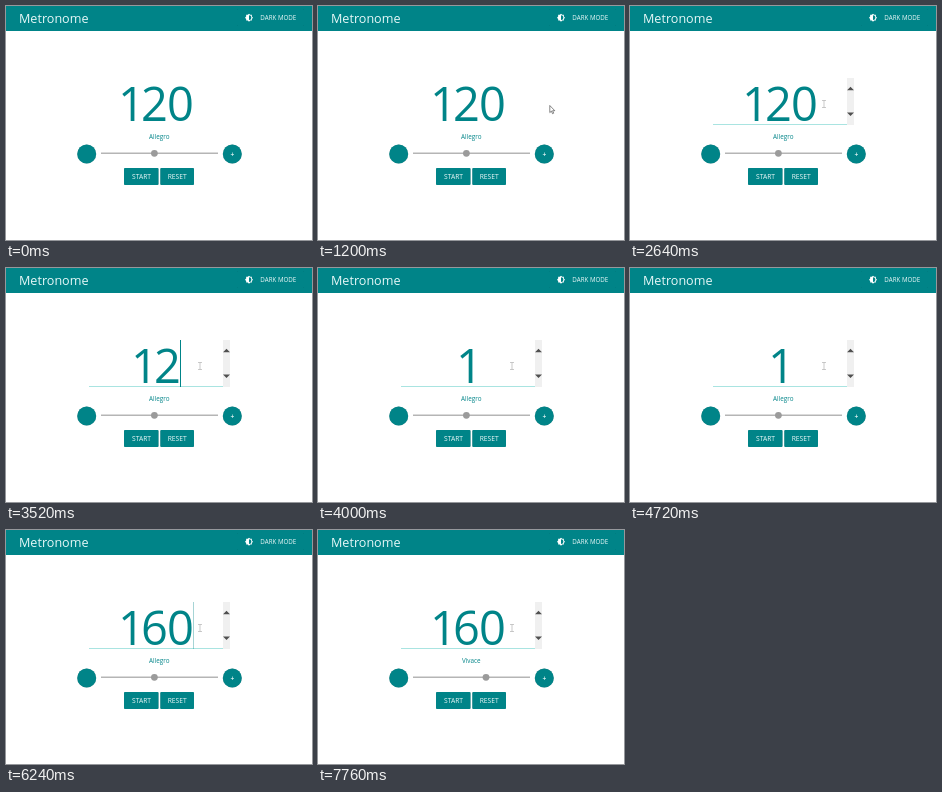
These frames come from a looping animation (306 by 234 pixels, 8 s). An HTML page:

```html
<!DOCTYPE html>
<html lang="en">
<head>
<meta charset="utf-8">
<title>Metronome</title>
<style>
  html, body { margin: 0; width: 100%; height: 100%; overflow: hidden; background: #fff; }
  svg { display: block; width: 306px; height: 234px; font-family: "Open Sans", "Noto Sans", sans-serif; }
  .teal { fill: #008488; }
  .raised { filter: drop-shadow(0 .6px .5px rgba(0, 0, 0, .28)); }
  .label { font-size: 6.7px; fill: #eaf8f8; text-anchor: middle; }
  #digits { font-size: 47px; letter-spacing: -.88px; }
  #tempo { font-size: 6.3px; text-anchor: middle; }
</style>
</head>
<body>
<svg viewBox="0 0 306 234">
  <rect width="306" height="234" fill="#fff"/>

  <rect class="teal" width="306" height="25"/>
  <text x="13" y="16.8" font-size="12.6" fill="#e6f8f8">Metronome</text>
  <rect class="teal raised" x="231" y="3" width="67" height="17" rx="1"/>
  <g transform="translate(243 11.7)">
    <path id="sun" fill="#fff"/>
    <path class="teal" d="M0 -2.4A2.4 2.4 0 0 1 0 2.4Z"/>
  </g>
  <text class="label" x="272.3" y="14" style="font-size: 6.2px">DARK MODE</text>

  <!-- dx sets the narrow leading 1 in the middle of its cell -->
  <text id="digits" class="teal" y="115" dx="3 -3"></text>
  <rect id="line" x="83" y="118" width="141" height="1" fill="#a9e4e1"/>
  <g id="spinner">
    <rect x="217" y="72" width="7" height="47" fill="#f0f0f0"/>
    <path d="M217 84.3L220.5 80.8L224 84.3ZM217 106.5L220.5 110L224 106.5Z" fill="#505050"/>
  </g>
  <rect id="caret" y="72" width="1" height="47" fill="#008488"/>

  <text id="tempo" class="teal" x="153.3" y="133.4"></text>
  <rect x="95" y="146.5" width="117" height="1.5" fill="#b5b5b5"/>
  <circle id="thumb" cy="147.3" r="3.4" fill="#9b9b9b"/>

  <g class="raised teal">
    <circle cx="80.7" cy="148" r="9.5"/>
    <circle cx="226.3" cy="148" r="9.5"/>
    <rect x="118" y="162" width="34.5" height="17" rx="1"/>
    <rect x="154.3" y="162" width="33.7" height="17" rx="1"/>
  </g>
  <text class="label" x="226.3" y="150.5" font-weight="600">+</text>
  <text class="label" x="135.5" y="173.2">START</text>
  <text class="label" x="171.2" y="173.2">RESET</text>

  <path id="arrow" d="M.5 .5V7.6L2.1 6.1L3.2 8.7L4.4 8.2L3.3 5.7H5.5Z" fill="#fff" stroke="#444" stroke-width=".65"/>
  <path id="beam" d="M-2 -3.5H2M0 -3.5V3.5M-2 3.5H2" fill="none" stroke="#b4b4b4" stroke-width=".7"/>
</svg>

<script>
  const LOOP = 8000, STEP = 80, CENTRE = 148, HALF_DIGIT = 13;
  const el = id => document.getElementById(id);
  const show = (id, on) => el(id).setAttribute("visibility", on ? "visible" : "hidden");

  // [start, value] pairs, each held until the next start
  const typed = [[0, "120"], [3520, "12"], [4000, "1"], [5920, "16"], [6240, "160"]];
  const caret = [[0, 0], [2080, 1], [2640, 0], [3120, 1], [3680, 0], [4160, 1], [4720, 0],
    [5200, 1], [5760, 0], [5920, 1], [6240, .35], [6320, 1], [6720, 0], [7360, 1], [7760, 0]];
  // [time, x, y] of the pointer
  const path = [[880, 301, 132], [1040, 264, 113], [1200, 231.3, 99], [1360, 216, 97], [1680, 200, 98], [1840, 194, 98]];

  const held = (list, t) => list.filter(([start]) => start <= t).pop()[1];

  function pointer(t) {
    const i = path.findIndex(p => p[0] > t);
    if (i < 0) return path[path.length - 1].slice(1);
    const a = path[i - 1], b = path[i], k = (t - a[0]) / (b[0] - a[0]);
    return [a[1] + (b[1] - a[1]) * k, a[2] + (b[2] - a[2]) * k];
  }

  function draw(t) {
    const text = held(typed, t), half = HALF_DIGIT * text.length;
    el("digits").textContent = text;
    el("digits").setAttribute("x", CENTRE - half);
    el("caret").setAttribute("x", CENTRE + half);
    el("caret").setAttribute("opacity", held(caret, t));
    show("line", t >= 2240);

    const lively = t >= 7760;
    el("tempo").textContent = lively ? "Vivace" : "Allegro";
    el("thumb").setAttribute("cx", lively ? 168 : 148.4);

    const here = t >= path[0][0];
    const [x, y] = here ? pointer(t) : [306, 140];
    const overText = x < 217;
    show("spinner", x < 224);
    show("arrow", here && !overText);
    show("beam", overText);
    for (const id of ["arrow", "beam"]) el(id).setAttribute("transform", `translate(${x} ${y})`);
  }

  // eight-pointed badge around the half disc
  el("sun").setAttribute("d", "M" + Array.from({ length: 16 }, (_, i) => {
    const r = i % 2 ? 3.1 : 4, a = i * Math.PI / 8;
    return (r * Math.cos(a)).toFixed(2) + " " + (r * Math.sin(a)).toFixed(2);
  }).join("L") + "Z");

  const begin = performance.now();
  function tick() {
    const t = (performance.now() - begin) % LOOP;
    draw(Math.floor(t / STEP) * STEP);
    requestAnimationFrame(tick);
  }
  tick();
</script>
</body>
</html>
```
